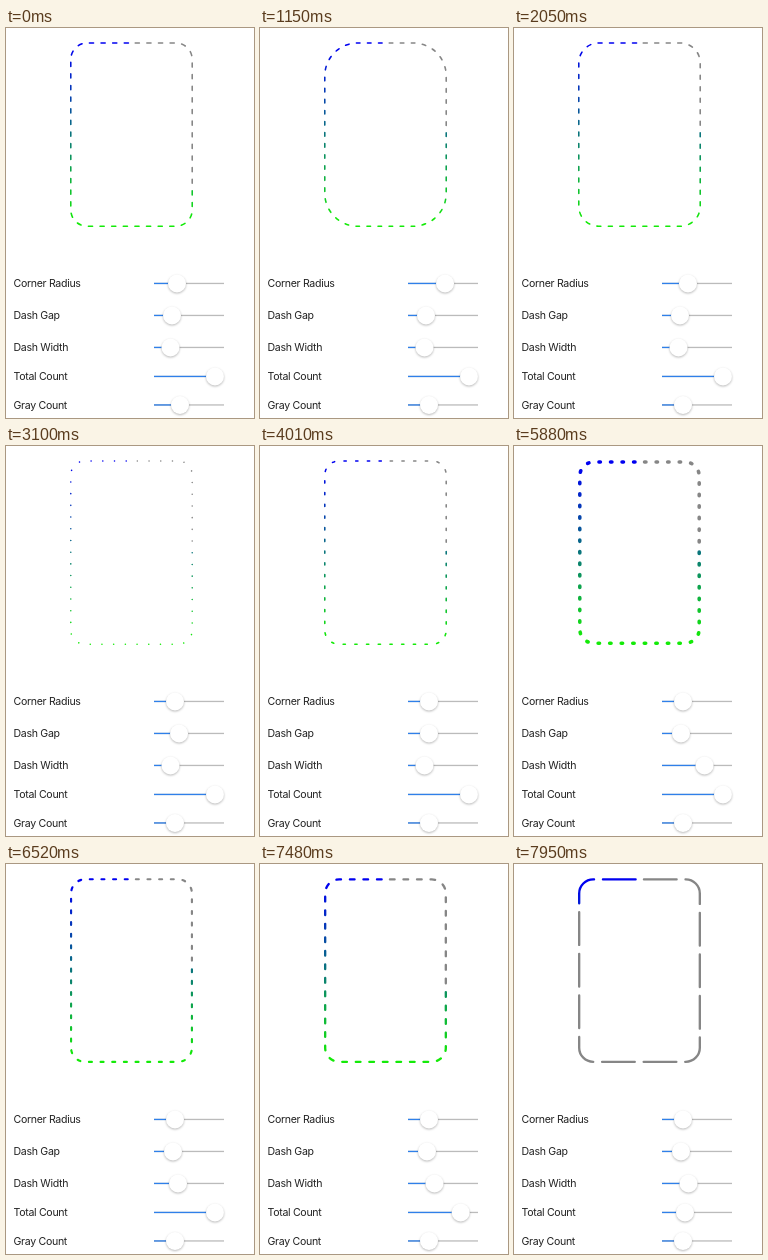
Animation, 248 px wide and 390 px high, one loop 8 s. Source, as an HTML page:

```html
<!DOCTYPE html>
<html lang="en">
<head>
<meta charset="utf-8">
<title>Dashed border</title>
<style>
html, body { margin: 0; width: 100%; height: 100%; overflow: hidden; background: #fff; }
svg { display: block; }
text { font: 10.6px Inter, Roboto, sans-serif; letter-spacing: -.32px; fill: #222; }
circle { fill: #fff; filter: drop-shadow(0 1.6px 1.3px rgba(0, 0, 0, .28)); }
#gray, #color { fill: none; stroke-linecap: round; }
</style>
</head>
<body>
<svg id="stage" width="248" height="390" viewBox="0 0 248 390">
  <defs>
    <linearGradient id="fade" gradientUnits="userSpaceOnUse" x1="0" y1="20" x2="0" y2="192">
      <stop offset="0" stop-color="#0000f0"/>
      <stop offset="1" stop-color="#14ea08"/>
    </linearGradient>
  </defs>
  <path id="gray" stroke="#868686"/>
  <path id="color" stroke="url(#fade)"/>
</svg>
<script>
const LOOP = 8000, KNOB_MIN = 157, KNOB_RANGE = 52;
const BOX = { x: 64, y: 14.2, w: 123, h: 184.8 };

// Knob position over time: [ms, x]
const sliders = [
  { label: 'Corner Radius', y: 255.5, keys: [[840, 171], [880, 173], [1030, 178], [1150, 185], [1500, 204], [1850, 197], [2050, 174], [2310, 169]] },
  { label: 'Dash Gap', y: 287.5, keys: [[2660, 166], [3160, 174], [3330, 174], [3700, 162], [4010, 169], [4130, 168], [4240, 167]] },
  { label: 'Dash Width', y: 319.5, keys: [[4670, 164.5], [5300, 197.5], [5470, 206], [5530, 206], [6280, 173], [6520, 172], [6890, 174.5]] },
  { label: 'Total Count', y: 348.5, keys: [[7350, 209], [7950, 171]] },
  { label: 'Gray Count', y: 377, keys: [[30, 174], [400, 169]] }
];

const stage = document.getElementById('stage');
const gray = document.getElementById('gray');
const color = document.getElementById('color');

function add(tag, attrs) {
  const el = document.createElementNS('http://www.w3.org/2000/svg', tag);
  for (const name in attrs) el.setAttribute(name, attrs[name]);
  return stage.appendChild(el);
}

for (const s of sliders) {
  add('text', { x: 7.5, y: s.y + 3.9 }).textContent = s.label;
  add('rect', { x: 148, y: s.y - .7, width: 70, height: 1.3, fill: '#bbb' });
  s.fill = add('rect', { x: 148, y: s.y - .7, height: 1.3, fill: '#2f80ea' });
  s.knob = add('circle', { cy: s.y, r: 9 });
}

function valueAt(keys, t) {
  const i = keys.findIndex(k => k[0] > t);
  if (i < 0) return keys[keys.length - 1][1];
  if (i === 0) return keys[0][1];
  const [t0, a] = keys[i - 1], [t1, b] = keys[i];
  return a + (b - a) * (t - t0) / (t1 - t0);
}

// Draws `count` dashes along the path, skipping the first `skip`
function drawDashes(path, d, width, seg, gap, skip, count) {
  const dash = Math.max(.01, seg - gap - width);
  const list = [];
  for (let i = 0; i < count; i++) list.push(dash, i < count - 1 ? seg - dash : 2000);
  path.setAttribute('d', d);
  path.setAttribute('stroke-width', width);
  path.setAttribute('stroke-dasharray', list.join(' '));
  path.setAttribute('stroke-dashoffset', -(skip * seg + (seg - dash) / 2));
}

function drawBorder(radius, gap, width, total, grayCount) {
  const x = BOX.x + width / 2, y = BOX.y + width / 2;
  const w = BOX.w - width, h = BOX.h - width;
  const r = Math.min(radius, w / 2);
  const arc = (dx, dy) => `a${r} ${r} 0 0 1 ${dx * r} ${dy * r}`;
  const d = `M${x + w / 2} ${y}H${x + w - r}${arc(1, 1)}V${y + h - r}${arc(-1, 1)}` +
    `H${x + r}${arc(-1, -1)}V${y + r}${arc(1, -1)}Z`;
  const seg = (2 * (w + h) - (8 - 2 * Math.PI) * r) / total;
  drawDashes(gray, d, width, seg, gap, 0, grayCount);
  drawDashes(color, d, width, seg, gap, grayCount, total - grayCount);
}

function frame(now) {
  const t = now % LOOP;
  const [corner, gap, width, total, grays] = sliders.map(s => {
    const x = valueAt(s.keys, t);
    s.knob.setAttribute('cx', x);
    s.fill.setAttribute('width', x - 148);
    return (x - KNOB_MIN) / KNOB_RANGE;
  });
  drawBorder(61 * corner, 34 * gap, 1 + 4 * width, Math.ceil(50 * total), Math.ceil(50 * grays));
  requestAnimationFrame(frame);
}

const start = performance.now();
requestAnimationFrame(function tick(now) {
  frame(Math.max(0, now - start));
  requestAnimationFrame(function loop() {});
});
</script>
</body>
</html>
```
